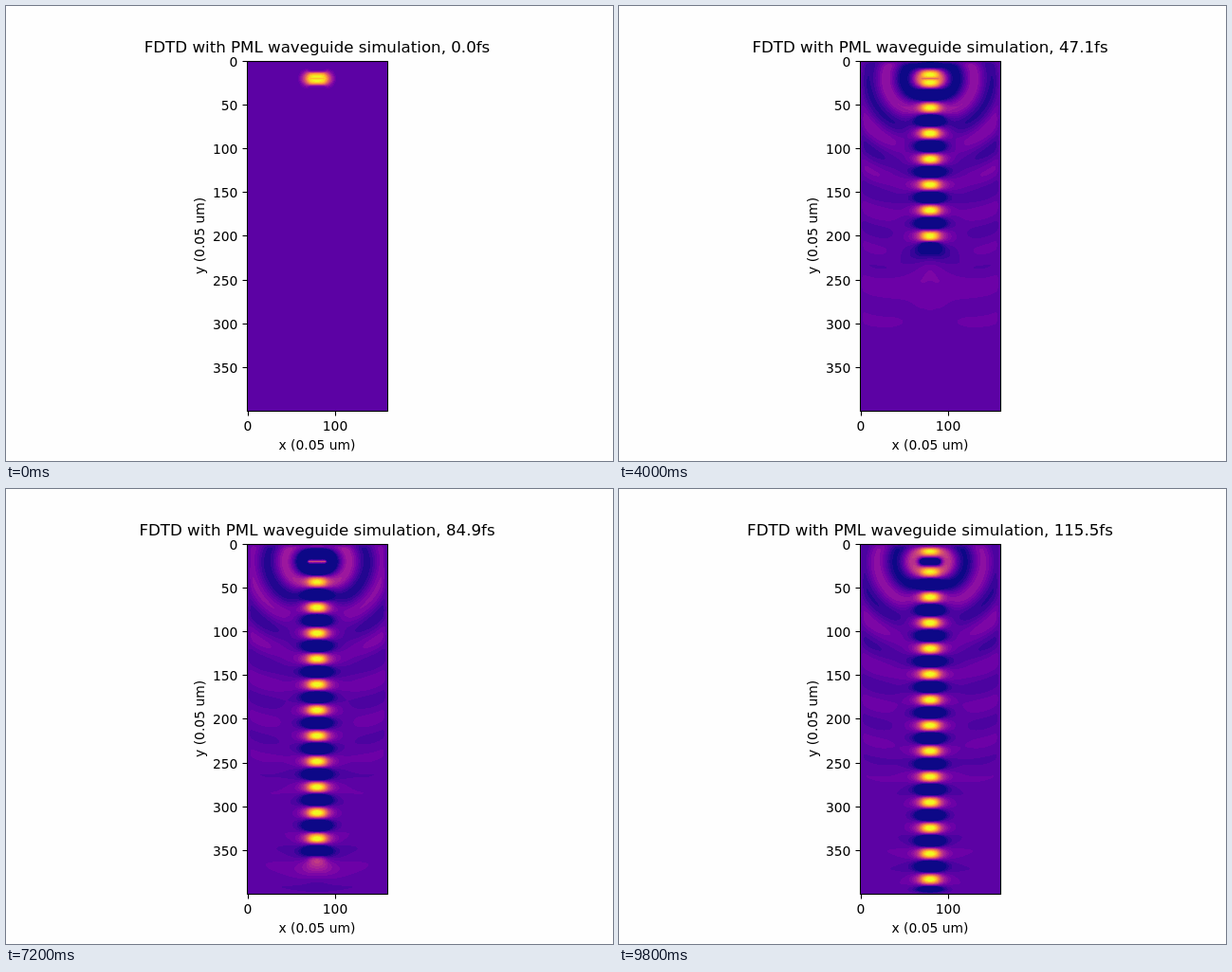
Recreate the animation shown at these times as an HTML page with a canvas. Size 640 by 480 pixels, loop 10 s.

```html
<!DOCTYPE html>
<html lang="en">
<head>
<meta charset="utf-8">
<title>Waveguide simulation</title>
<style>
  html, body { margin: 0; width: 100%; height: 100%; overflow: hidden; background: #fefefe; }
  #stage { position: relative; width: 640px; height: 480px; }
  canvas { position: absolute; left: 254px; top: 58px; }
  svg { position: absolute; left: 0; top: 0; }
  text { font: 13.89px "DejaVu Sans", sans-serif; }
  #title { font-size: 16.67px; }
  .mid { text-anchor: middle; }
  .end { text-anchor: end; }
</style>
</head>
<body>
<div id="stage">
  <canvas id="field" width="148" height="370"></canvas>
  <svg width="640" height="480">
    <rect x="254.5" y="58.5" width="148" height="369" fill="none" stroke="#000" stroke-width="1.1"/>
    <g id="ticks" stroke-width="1.1"></g>
    <text id="title" class="mid" x="328" y="49.3">FDTD with PML waveguide simulation, 0.0fs</text>
    <text class="mid" x="328" y="467.6">x (0.05 um)</text>
    <text class="mid" transform="translate(209 242.4) rotate(-90)">y (0.05 um)</text>
  </svg>
</div>
<script>
const FRAMES = 50, FRAME_MS = 200, STEPS = 20;
const COLS = 160, HALF = COLS / 2, ROWS = 400, CELL = 0.924;
const COURANT = Math.SQRT1_2, WAVELENGTH = 40, STEP_FS = 0.05 / 0.3 * COURANT;
const CORE = 70, CORE_EPS = 2.25, SOURCE_ROW = 20;
const PML = 10, PML_LOSS = 0.33, V_MIN = -0.2, V_MAX = 1;

// Loss factors at cell position p; the layer grows cubically towards each wall.
function damping(length, offset) {
  return Array.from({ length }, (_, i) => {
    const p = i + offset;
    return p;
  });
}
function lossAt(p, size) {
  const depth = Math.max(PML - p, p - (size - 1 - PML), 0) / PML;
  const s = PML_LOSS * depth ** 3;
  return [(1 - s) / (1 + s), COURANT / (1 + s)];
}
const profile = (count, offset, size) =>
  damping(count, offset).map(p => lossAt(p, size));

// Only the left half is simulated; the field mirrors about the guide's axis.
function simulate() {
  const grid = () => new Float64Array(HALF * ROWS);
  const ez = grid(), ezx = grid(), ezy = grid(), hx = grid(), hy = grid();
  const ex = profile(HALF, 0, COLS), mx = profile(HALF, 0.5, COLS);
  const ey = profile(ROWS, 0, ROWS), my = profile(ROWS, 0.5, ROWS);
  const frames = [];
  for (let n = 0; n < FRAMES * STEPS; n++) {
    for (let y = 1; y < ROWS; y++) {
      const [keepY, gainY] = ey[y];
      for (let x = 1; x < HALF; x++) {
        const i = y * HALF + x, c = ex[x], eps = x >= CORE ? CORE_EPS : 1;
        ezx[i] = c[0] * ezx[i] + c[1] / eps * (hy[i] - hy[i - 1]);
        ezy[i] = keepY * ezy[i] + gainY / eps * (hx[i] - hx[i - HALF]);
        ez[i] = ezx[i] + ezy[i];
      }
    }
    const drive = Math.sin(2 * Math.PI * n * COURANT / WAVELENGTH);
    for (let x = CORE; x < HALF; x++) {
      const i = SOURCE_ROW * HALF + x;
      ez[i] = drive;
      ezx[i] = ezy[i] = drive / 2;
    }
    for (let y = 0; y < ROWS - 1; y++) {
      const [keepY, gainY] = my[y];
      for (let x = 0; x < HALF; x++) {
        const i = y * HALF + x, c = mx[x];
        hx[i] = keepY * hx[i] + gainY * (ez[i + HALF] - ez[i]);
        if (x < HALF - 1) hy[i] = c[0] * hy[i] + c[1] * (ez[i + 1] - ez[i]);
      }
    }
    if (n % STEPS === STEPS - 1) frames.push(Float32Array.from(ez));
  }
  return frames;
}

const STOPS = ["0d0887", "46039f", "7201a8", "9c179e", "bd3786",
  "d8576b", "ed7953", "fb9f3a", "fdca26", "f0f921"]
  .map(hex => [0, 2, 4].map(k => parseInt(hex.slice(k, k + 2), 16)));

function plasma(f) {
  const p = f * (STOPS.length - 1), k = Math.min(Math.floor(p), STOPS.length - 2);
  return STOPS[k].map((v, c) => v + (STOPS[k + 1][c] - v) * (p - k));
}

// Colours fall into flat bands centred on the zero level.
const BAND = 1 / 24, ZERO = -V_MIN / (V_MAX - V_MIN);
function colour(value) {
  const f = (value - V_MIN) / (V_MAX - V_MIN);
  const banded = ZERO + Math.round((f - ZERO) / BAND) * BAND;
  return plasma(Math.min(Math.max(banded, 0), 1));
}

const clamp = (v, max) => Math.min(Math.max(v, 0), max);
function sample(field, px, py) {
  const x = clamp((px + 0.42) / CELL - 0.5, COLS - 1);
  const y = clamp((py + 0.9) / CELL - 0.5, ROWS - 1);
  const x0 = Math.floor(x), y0 = Math.floor(y), u = x - x0, v = y - y0;
  const at = (cx, cy) =>
    field[Math.min(cy, ROWS - 1) * HALF + (cx < HALF ? cx : Math.max(COLS - 1 - cx, 0))];
  return (at(x0, y0) * (1 - u) + at(x0 + 1, y0) * u) * (1 - v)
    + (at(x0, y0 + 1) * (1 - u) + at(x0 + 1, y0 + 1) * u) * v;
}

const ctx = document.getElementById("field").getContext("2d");
const title = document.getElementById("title");
const { width, height } = ctx.canvas;
const image = ctx.createImageData(width, height);

function draw(field, index) {
  for (let y = 0, i = 0; y < height; y++) {
    for (let x = 0; x < width; x++, i += 4) {
      image.data.set(colour(sample(field, x, y)), i);
      image.data[i + 3] = 255;
    }
  }
  ctx.putImageData(image, 0, 0);
  const fs = (index * STEPS * STEP_FS).toFixed(1);
  title.textContent = `FDTD with PML waveguide simulation, ${fs}fs`;
}

function drawTicks() {
  const parts = [];
  for (let v = 0; v < ROWS; v += 50) {
    const y = Math.floor(57.6 + (v + 0.5) * CELL) + 0.5;
    parts.push(`<path d="M249.5 ${y}H254.5" stroke="#000"/>`,
      `<text class="end" x="244.4" y="${y + 5}">${v}</text>`);
  }
  for (const v of [0, 100]) {
    const x = Math.round(254.08 + (v + 0.5) * CELL) + 0.5;
    parts.push(`<path d="M${x} 427.5V432.5" stroke="#000"/>`,
      `<text class="mid" x="${x - 0.5}" y="447.6">${v}</text>`);
  }
  document.getElementById("ticks").innerHTML = parts.join("");
}

drawTicks();
const frames = simulate();
const start = performance.now();
let shown = -1;
function tick() {
  const index = Math.floor((performance.now() - start) / FRAME_MS) % FRAMES;
  if (index !== shown) draw(frames[shown = index], index);
  requestAnimationFrame(tick);
}
tick();
</script>
</body>
</html>
```
